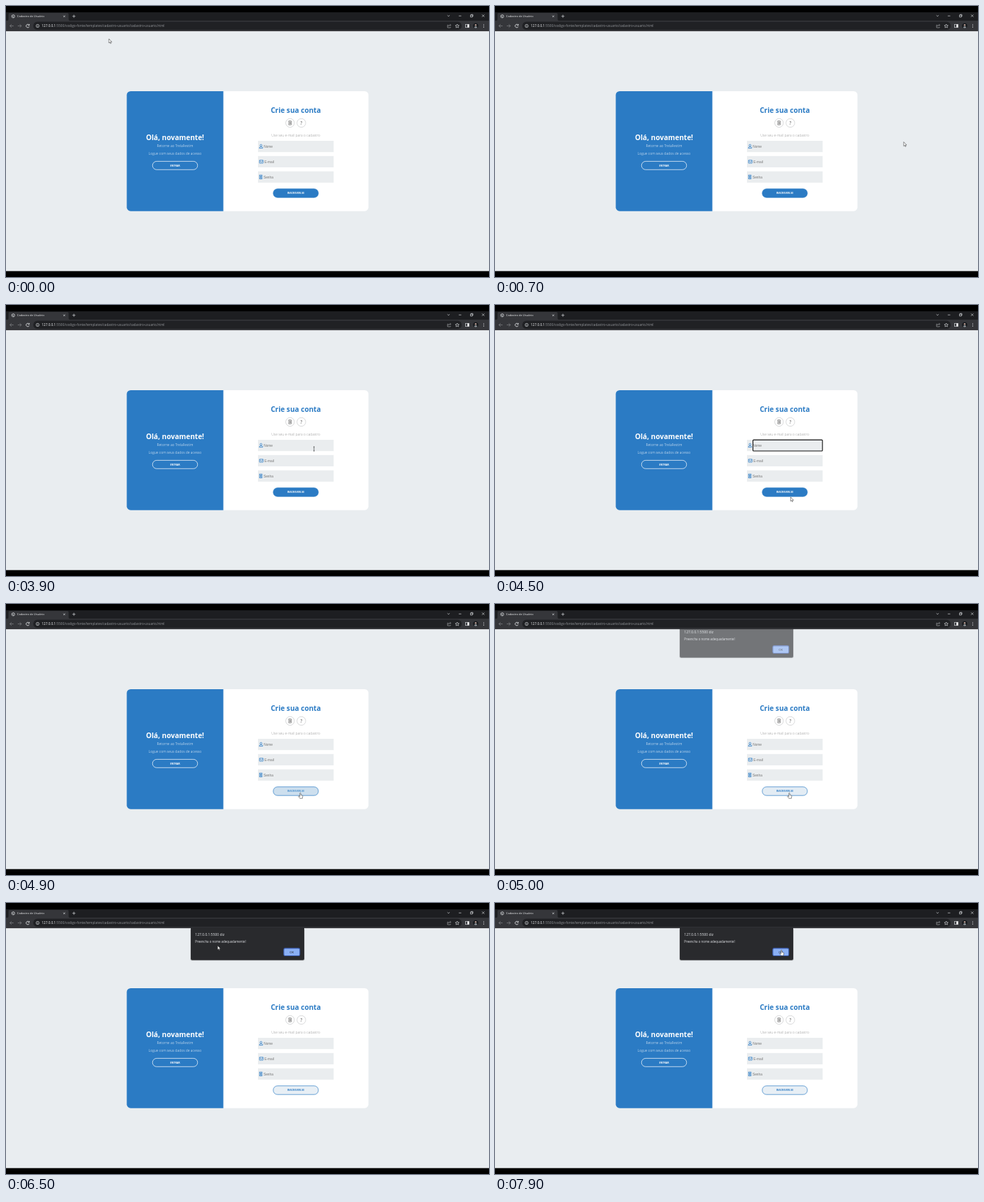
Animation, 690 px wide and 388 px high, one loop 8000 ms. Source, as an HTML page:

```html
<!DOCTYPE html>
<html lang="pt-BR">
<head>
<meta charset="utf-8">
<title>Cadastro de Usuário</title>
<style>
  html, body { margin: 0; width: 100%; height: 100%; overflow: hidden; background: #000; }
  svg { display: block; width: 100vw; height: 100vh; font-family: "Open Sans", sans-serif; }
  .line { fill: none; stroke: #d5d7da; stroke-width: .7; }
  .mid { text-anchor: middle; }
  .title { font-size: 10.1px; font-weight: 700; }
  .light { font-size: 5.03px; font-weight: 300; }
  .button { font-size: 3.6px; font-weight: 700; }
  .field { font: 4.8px "Liberation Sans", Arial, sans-serif; fill: #757575; }
  .blue { fill: none; stroke: #2b7bc4; stroke-width: .75; }
</style>
</head>
<body>
<svg viewBox="0 0 690 388">
  <defs>
    <clipPath id="card"><rect x="172.5" y="122" width="345.3" height="171.7" rx="5.5"/></clipPath>
    <clipPath id="below"><rect y="35" width="690" height="345"/></clipPath>
    <g id="missing">
      <rect x="-1.8" y="-2.7" width="3.6" height="5.4"/>
      <path d="M-1.2-2 1.2 2M1.2-2-1.2 2"/>
    </g>
  </defs>

  <!-- browser window -->
  <rect width="690" height="388"/>
  <rect y="9" width="690" height="13" fill="#1d1e21"/>
  <path d="M2 21q1.5 0 1.5-2v-7q0-2 2-2h82q2 0 2 2v7q0 2 1.5 2H690v15.5H0V21z" fill="#35363a"/>
  <rect x="39" y="22.5" width="612" height="11.8" rx="5.9" fill="#202124"/>
  <g class="line">
    <circle cx="10.3" cy="14.8" r="2.2"/>
    <path d="M8.3 14.2l2 .8.6 1.8M10.3 12.8l1.6 1.4"/>
    <path d="M82 13.5l2.5 2.5m0-2.5L82 16M94.8 14.7h4.4m-2.2-2.2v4.4"/>
    <path d="M630.6 13.3l1.6 1.5 1.6-1.5M646.8 14.2h3.6M663.5 13h2.7v2.8h-2.7zM664.3 13v-.8h2.7v2.8h-.8M680 12.3l3.4 3.4m0-3.4L680 15.7"/>
    <path d="M10.8 28.5H5.6m2.4-2.4-2.4 2.4 2.4 2.4M16.8 28.5H22m-2.4-2.4 2.4 2.4-2.4 2.4" stroke="#85878a"/>
    <path d="M32.9 27.2a2.3 2.3 0 1 0 .3 2.2M33.3 25.8v1.9h-1.9" stroke-width=".9"/>
    <circle cx="45.2" cy="28.5" r="2.2"/>
    <path d="M45.2 28.2v1.6m0-2.7v.5"/>
    <path d="M632 27.3h-1.2v3.7h4.2v-1.1M631.9 29.3q.4-2 2.4-2h1m-1-1.2 1.3 1.2-1.3 1.3" stroke="#a0a2a5"/>
    <path d="M644.6 26l.8 1.7 1.9.2-1.4 1.3.4 1.9-1.7-1-1.7 1 .4-1.9-1.4-1.3 1.9-.2z"/>
    <rect x="656.6" y="26.3" width="4.7" height="4.4"/>
  </g>
  <path d="M659.2 26.3h2.1v4.4h-2.1z" fill="#fff"/>
  <circle cx="671" cy="28.3" r="3.6" fill="#15181c"/>
  <path d="M668.8 31.1q.3-2 2.2-2t2.2 2q-2.2 1.5-4.4 0" fill="#8f969c"/>
  <circle cx="671" cy="27.2" r="1.3" fill="#b89c92"/>
  <g fill="#d5d7da">
    <circle cx="682.4" cy="26.6" r=".55"/><circle cx="682.4" cy="28.5" r=".55"/><circle cx="682.4" cy="30.4" r=".55"/>
  </g>
  <text x="15.8" y="16.3" font-size="4.1" fill="#f1f2f4">Cadastro de Usuário</text>
  <text x="51" y="30.2" font-size="4.76" fill="#95989c"><tspan fill="#f1f2f4">127.0.0.1</tspan>:5500/codigo-fonte/templates/cadastro-usuario/cadastro-usuario.html</text>

  <!-- page -->
  <rect y="36.3" width="690" height="343" fill="#e9edf0"/>
  <path d="M0 36.7h690M0 379h690" stroke="#f5f7f8" stroke-width=".7"/>
  <g clip-path="url(#card)">
    <rect x="172" y="122" width="346" height="172" fill="#fff"/>
    <rect x="172" y="122" width="138.5" height="172" fill="#2b7bc4"/>
  </g>
  <g class="mid" fill="#fff">
    <text class="title" x="241.5" y="192.2">Olá, novamente!</text>
    <text class="light" x="241.5" y="202.3">Retorne ao TrelaFestim</text>
    <text class="light" x="241.5" y="213">Logue com seus dados de acesso</text>
    <rect x="209.3" y="222.4" width="64.4" height="11.9" rx="5.9" fill="none" stroke="#fff" stroke-width=".7"/>
    <text class="button" x="241.5" y="229.6">ENTRAR</text>
  </g>
  <g class="mid">
    <text class="title" x="414" y="152.5" fill="#2b7bc4">Crie sua conta</text>
    <g fill="none" stroke="#bfc1c3" stroke-width=".6">
      <circle cx="405.8" cy="167.4" r="6.2"/><circle cx="421.9" cy="167.4" r="6.2"/>
      <use href="#missing" x="405.8" y="167.4" stroke="#555"/>
    </g>
    <text x="421.9" y="169.9" font-size="6.6" fill="#555">?</text>
    <text class="light" x="414" y="186.8" fill="#8c8c8c">Use seu e-mail para o cadastro</text>
  </g>
  <g fill="#eaedef">
    <rect x="360" y="193" width="108" height="16.2"/>
    <rect x="360" y="214.8" width="108" height="16.2"/>
    <rect x="360" y="236.7" width="108" height="16.2"/>
  </g>
  <g class="blue">
    <circle cx="364.3" cy="199.6" r="1.4"/>
    <path d="M361.9 203.6q0-2.2 2.4-2.2t2.4 2.2z"/>
    <path d="M362.2 220.8h5v4.2h-5zm0 .8 2.5 1.9 2.5-1.9"/>
    <use href="#missing" x="364" y="244.8"/>
  </g>
  <g class="field">
    <text x="368.2" y="202.8">Nome</text>
    <text x="369.3" y="224.7">E-mail</text>
    <text x="368" y="246.6">Senha</text>
  </g>
  <rect id="focus" x="368.5" y="193.1" width="99.3" height="15.9" rx="1" fill="none" stroke="#111" stroke-width="1.1"/>
  <rect id="submit" x="381.8" y="261.8" width="64.4" height="12.4" rx="6" stroke="#2b7bc4" stroke-width=".7"/>
  <text id="submitText" class="button mid" x="414" y="269.4">INSCREVER-SE</text>

  <!-- alert -->
  <g clip-path="url(#below)">
    <g id="alert">
      <rect x="263.4" y="36" width="163.2" height="46.6" rx="2.4" fill="#000" opacity=".25"/>
      <rect x="264" y="33" width="162" height="48.8" rx="2" fill="#292a2d"/>
      <text x="270.3" y="46.6" font-size="5" fill="#e4e6ea">127.0.0.1:5500 diz</text>
      <text x="270.3" y="56.8" font-size="4.41" fill="#e4e6ea">Preencha o nome adequadamente!</text>
      <rect x="396.9" y="64.9" width="22.8" height="10.6" rx="1.8" fill="#8ab0f5" stroke="#3f60b4" stroke-width="1.1"/>
      <text class="mid" x="408.2" y="71.7" font-size="4.2" fill="#202124">OK</text>
    </g>
  </g>

  <!-- pointers, each with its hot spot at 0,0 -->
  <g id="pointer" stroke-linejoin="round">
    <path id="arrow" d="M0 0v6l1.4-1.2.9 2 .9-.4-.9-2h1.9z" fill="#fff" stroke="#222" stroke-width=".5"/>
    <path id="beam" d="M-1-3h2M0-3v6M-1 3h2" fill="none" stroke="#222" stroke-width=".6"/>
    <path id="hand" d="M-.7.5q.7-1 1.3 0v2.7l2 .4q.9.3.8 1.2l-.5 3.2h-3.6l-2-3q.3-.8 1.1-.3l.9.7z" fill="#fff" stroke="#222" stroke-width=".5"/>
  </g>
</svg>
<script>
const LOOP = 8000;
const $ = id => document.getElementById(id);

// time, x, y, shape: the pointer jumps from one stop to the next
const stops = [
  [0, 147, 47, 'arrow'], [100, 270, 88, 'arrow'], [200, 354, 116, 'arrow'],
  [400, 600, 183, 'arrow'], [500, 583.7, 193.5, 'arrow'], [700, 583.9, 194.6, 'arrow'],
  [2400, 584, 196, 'arrow'], [2500, 591, 204, 'arrow'], [3400, 495.5, 214, 'arrow'],
  [3900, 440, 206, 'beam'], [4000, 406, 206, 'beam'], [4400, 414, 235, 'arrow'],
  [4500, 422.3, 275, 'arrow'], [4700, 420.5, 270.3, 'hand'],
  [5900, 340, 130, 'arrow'], [6000, 302, 61, 'arrow'], [6500, 302.3, 61, 'arrow'],
  [7000, 335.5, 59.5, 'arrow'], [7400, 360, 65, 'arrow'], [7500, 393, 67, 'arrow'],
  [7600, 407, 67, 'hand'], [7900, 409.3, 67.3, 'hand']
];

const progress = (t, start, length) => Math.min(1, Math.max(0, (t - start) / length));
const mix = (a, b, k) => `rgb(${a.map((v, i) => Math.round(v + (b[i] - v) * k))})`;
const show = (id, on) => $(id).style.display = on ? '' : 'none';

const BLUE = [43, 123, 196], WHITE = [255, 255, 255], PALE = [232, 239, 245];

function draw(t) {
  const [, x, y, shape] = stops.findLast(stop => stop[0] <= t);
  $('pointer').setAttribute('transform', `translate(${x} ${y})`);
  for (const id of ['arrow', 'beam', 'hand']) show(id, id === shape);

  show('focus', t >= 4000 && t < 4800);

  const hover = 1 - (1 - progress(t, 4650, 450)) ** 2.4;
  $('submit').setAttribute('fill', mix(BLUE, PALE, hover));
  $('submitText').setAttribute('fill', mix(WHITE, BLUE, hover));

  const drop = progress(t, 4950, 250);
  $('alert').setAttribute('transform', `translate(0 ${-8 * (1 - drop) ** 2})`);
  $('alert').setAttribute('opacity', Math.min(1, drop * 3));
}

function tick() {
  draw(performance.now() % LOOP);
  requestAnimationFrame(tick);
}
tick();
</script>
</body>
</html>
```
